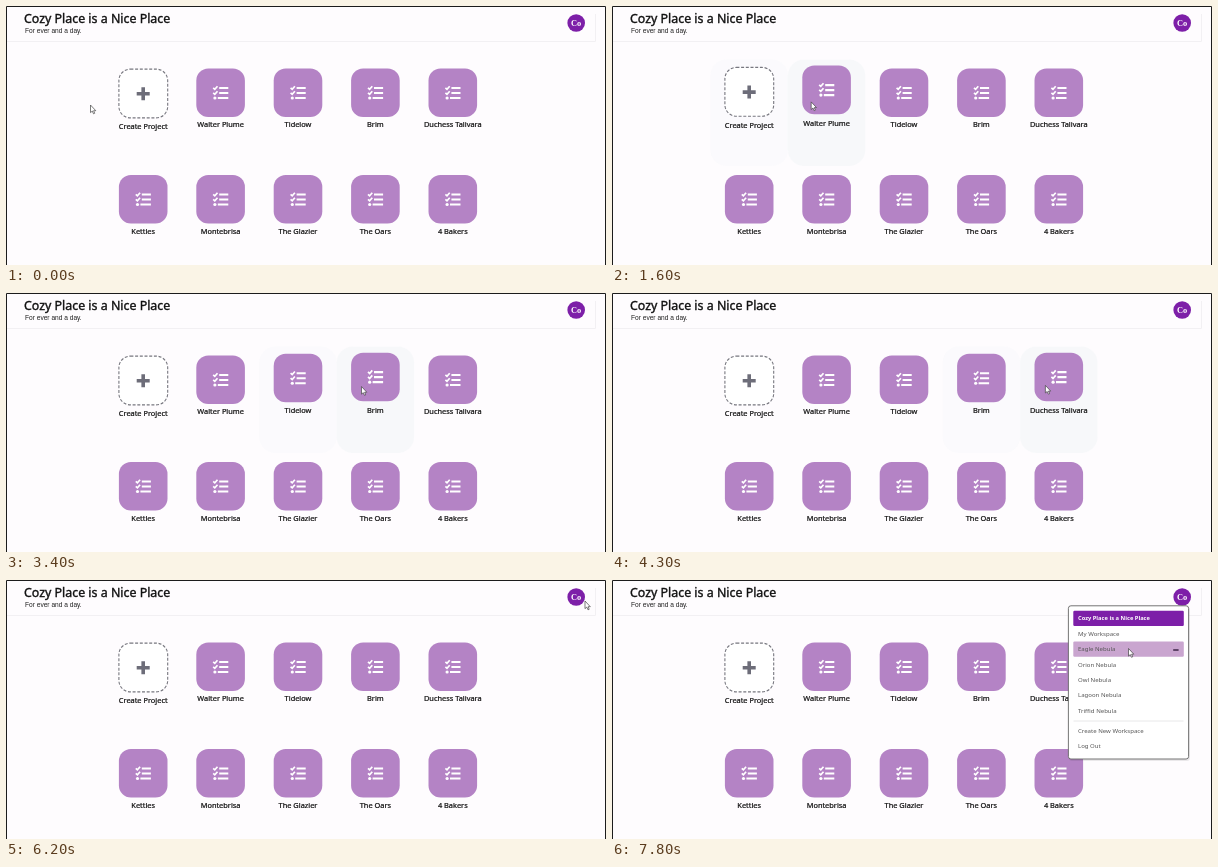
An HTML page that plays this animation: 600 px wide and 259 px high, repeating every 8 s.

```html
<!DOCTYPE html>
<html lang="en">
<head>
<meta charset="utf-8">
<title>Workspace projects</title>
<style>
  html, body { margin: 0; width: 100%; height: 100%; overflow: hidden; background: #fefcfe; }
  svg { display: block; width: 100%; height: 100%; }
  text { font-family: "Noto Sans", "Open Sans", sans-serif; fill: #111; }
  .title { font-size: 12.4px; stroke: #111; stroke-width: .35; }
  .sub { font-family: "Liberation Sans", Arial, sans-serif; font-size: 6.6px; fill: #222; }
  .label { font-size: 7.4px; text-anchor: middle; stroke: #111; stroke-width: .22; }
  .initials { font: bold 8.4px "Liberation Serif", serif; fill: #fff; text-anchor: middle; }
  .panel { fill: #f3f6f8; }
  .tile { fill: #b483c5; }
  .menu text { font-size: 6.05px; fill: #555; }
  .menu .current { font-size: 5.75px; font-weight: bold; fill: #fff; }
</style>
</head>
<body>
<svg viewBox="0 0 600 259">
  <defs>
    <g id="list" fill="none" stroke="#fff">
      <path d="M-1.4 -4.8H7.7M-1.4 0.2H7.7M-2.8 5.2H7.7" stroke-width="2.2"/>
      <path d="M-7.4 -5L-5.8 -3.5L-3.1 -6.6M-7.4 0L-5.8 1.5L-3.1 -1.6" stroke-width="1.7"/>
      <circle cx="-5.7" cy="5.2" r="1.6" fill="#fff" stroke="none"/>
    </g>
  </defs>

  <rect width="600" height="259" fill="#fefcfe"/>
  <path d="M1 35.5H589.5V8" fill="none" stroke="#f2f0f3"/>
  <path d="M.5 259V.5H599.5V259" fill="none" stroke="#1c1c1c"/>
  <text class="title" x="18" y="17.2">Cozy Place is a Nice Place</text>
  <text class="sub" x="19" y="27.4">For ever and a day.</text>
  <circle cx="570.2" cy="17" r="8.8" fill="#7d1fa8"/>
  <text class="initials" x="570.2" y="19.8">Co</text>

  <g id="panels"></g>
  <g id="cards"></g>

  <g id="menu" class="menu">
    <rect x="457" y="27" width="121" height="154" rx="3" fill="#000" opacity=".08"/>
    <rect x="456.4" y="25.8" width="120.2" height="153.2" rx="2.5" fill="#fff" stroke="#666" stroke-width=".9"/>
    <rect x="461.3" y="30.8" width="110.5" height="15.2" rx="1.2" fill="#7d1fa8"/>
    <path d="M461.5 141H571.5" stroke="#e2e2e4" stroke-width=".8"/>
  </g>

  <path id="cursor" d="M0 0V7.6L1.8 6.1L3 8.8L4.2 8.3L3.1 5.7H5.3Z"
        fill="#fff" stroke="#444" stroke-width=".7" stroke-linejoin="round"/>
</svg>

<script>
  const LOOP = 8000, FADE = 400, COLUMN = 77.4, ROW = 15.4;
  const $ = id => document.getElementById(id);
  const clamp = p => Math.min(1, Math.max(0, p));
  const smooth = p => p * p * (3 - 2 * p);
  const easeOut = p => 1 - (1 - p) ** 2.2;

  function add(parent, tag, attrs, text) {
    const el = document.createElementNS('http://www.w3.org/2000/svg', tag);
    for (const k in attrs) el.setAttribute(k, attrs[k]);
    if (text) el.textContent = text;
    return parent.appendChild(el);
  }

  const move = (el, x, y) => el.setAttribute('transform', `translate(${x} ${y})`);

  // Pointer glides: along the cards at a steady beat, then off to the menu.
  const home = { x: 84.5, y: 99 };
  const glides = [
    { at: 400, dur: 400, x: 125, y: 97 },
    ...[1, 2, 3, 4].map(k => ({ at: 185 + 915 * k, dur: 600, x: 125 + 80 * k, y: 97 - 1.2 * k })),
    { at: 4760, dur: 840, x: 534, y: 90 },
    { at: 5650, dur: 350, x: 579, y: 21 },
    { at: 6200, dur: 200, x: 571, y: 16 },
    { at: 7000, dur: 650, x: 516.5, y: 68.5 }
  ];

  function pointer(t) {
    let { x, y } = home;
    for (const g of glides) {
      const p = smooth(clamp((t - g.at) / g.dur));
      x += (g.x - x) * p;
      y += (g.y - y) * p;
    }
    return { x, y };
  }

  // Times at which the pointer enters and leaves the column around cx.
  function hoverSpan(cx) {
    const inside = t => Math.abs(pointer(t).x - cx) < 36;
    let start = 0;
    while (!inside(start)) start += 5;
    let end = start;
    while (inside(end)) end += 5;
    return { start, end };
  }

  const names = [
    'Create Project', 'Walter Plume', 'Tidelow', 'Brim', 'Duchess Talivara',
    'Kettles', 'Montebrisa', 'The Glazier', 'The Oars', '4 Bakers'
  ];
  const cards = [];

  names.forEach((name, i) => {
    const x = 137.2 + COLUMN * (i % 5);
    const card = add($('cards'), 'g', {});
    move(card, x, i < 5 ? 86.8 : 193.3);
    const tile = add(card, 'g', {});
    if (i) {
      add(tile, 'rect', { class: 'tile', x: -24.3, y: -24.3, width: 48.6, height: 48.6, rx: 12 });
      add(tile, 'use', { href: '#list' });
    } else {
      add(tile, 'rect', {
        x: -24.3, y: -23.7, width: 48.8, height: 48.8, rx: 11.5, fill: '#fff',
        stroke: '#77777f', 'stroke-width': 1.1, 'stroke-dasharray': '3 1.7'
      });
      add(tile, 'path', { d: 'M-6.5 1H6.5M0 -5.5V7.5', stroke: '#6d6d79', 'stroke-width': 3.6 });
    }
    const label = add(card, 'text', { class: 'label', y: i ? 34.3 : 36.2 }, name);

    if (i < 5) {
      const panel = add($('panels'), 'rect', {
        class: 'panel', x: x - COLUMN / 2, y: 53.5, width: COLUMN, height: 106.5, rx: 16
      });
      cards.push({ tile, label, panel, ...hoverSpan(x) });
    }
  });

  const items = [
    'Cozy Place is a Nice Place', 'My Workspace', 'Eagle Nebula', 'Orion Nebula',
    'Owl Nebula', 'Lagoon Nebula', 'Triffid Nebula', 'Create New Workspace', 'Log Out'
  ];
  const rows = [];

  items.forEach((item, i) => {
    const y = 38.4 + ROW * i + (i > 6 ? 4.6 : 0);
    if (i) {
      const mark = add($('menu'), 'g', {});
      add(mark, 'rect', { x: 461.3, y: y - 7.6, width: 110.5, height: 15.2, rx: 1.2, fill: '#c9a5cf' });
      add(mark, 'path', { d: `M561.2 ${y + .8}h5.4`, stroke: '#3d2446', 'stroke-width': 1.5 });
      rows.push({ mark, y });
    }
    add($('menu'), 'text', { class: i ? '' : 'current', x: 466, y: y + 2 }, item);
  });

  function draw(t) {
    const { x, y } = pointer(t);
    move($('cursor'), x, y);

    for (const c of cards) {
      const lift = easeOut(clamp((t - c.start) / FADE)) * (1 - easeOut(clamp((t - c.end) / FADE)));
      move(c.tile, 0, -5 * lift);
      move(c.label, 0, -2.5 * lift);
      c.panel.setAttribute('opacity', lift);
    }

    $('menu').setAttribute('opacity', smooth(clamp((t - 6250) / 250)));
    for (const r of rows) {
      const over = Math.abs(y - r.y) < ROW / 2;
      r.mark.setAttribute('visibility', over ? 'visible' : 'hidden');
    }
  }

  const begin = performance.now();
  function tick() {
    draw((performance.now() - begin) % LOOP);
    requestAnimationFrame(tick);
  }
  tick();
</script>
</body>
</html>
```
